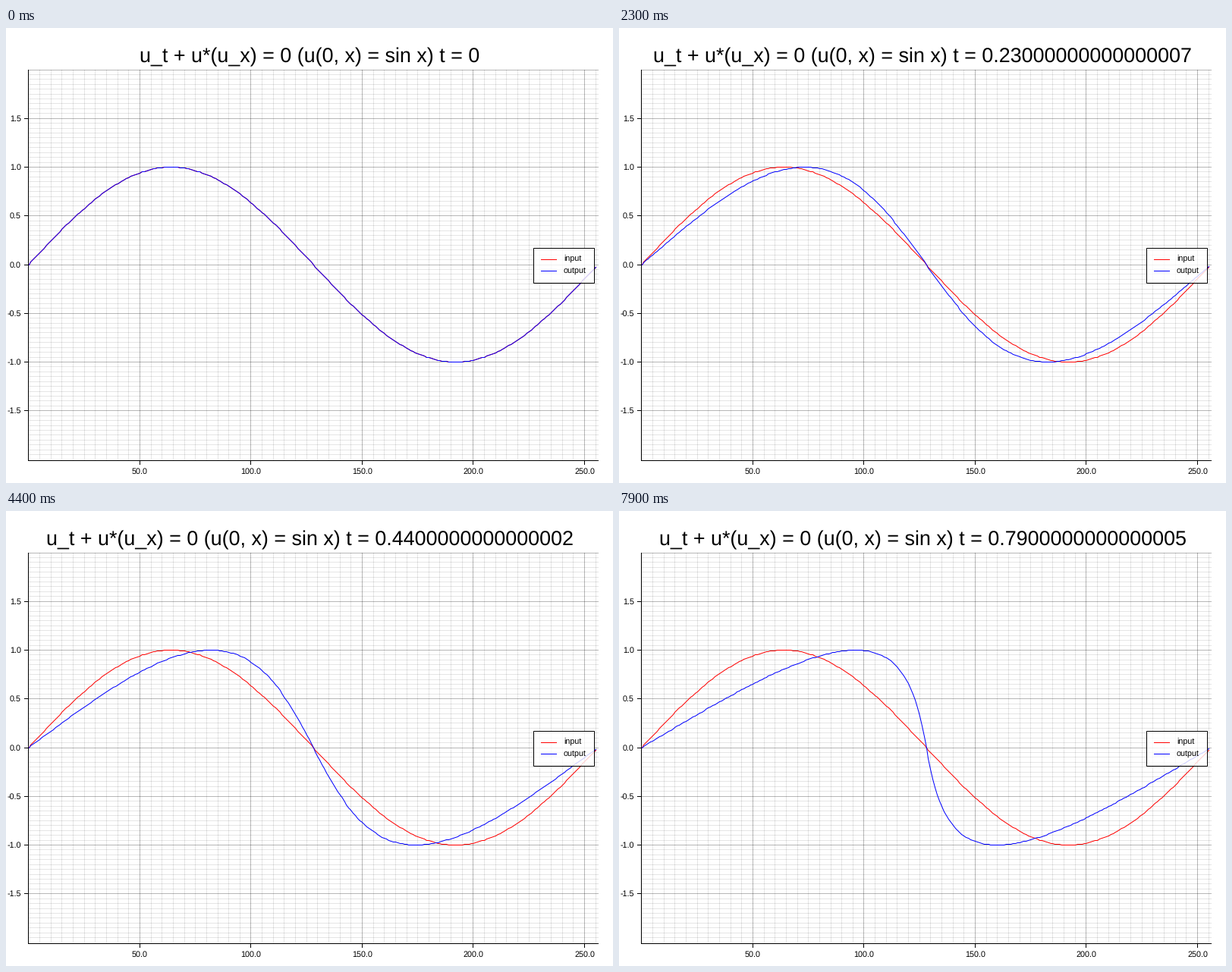
Write a matplotlib script that moves like this. It is 800 by 600 pixels and loops after 8 s.

```python
import numpy as np
import matplotlib.pyplot as plt
from itertools import accumulate
from matplotlib.animation import FuncAnimation
from matplotlib.collections import LineCollection
from matplotlib.patches import Rectangle

W, H, DPI = 800, 600, 100
PX = 72 / DPI
N, FRAMES, STEP = 256, 80, 0.01
LEFT, RIGHT, TOP, BOTTOM = 30, 780, 55, 569

plt.rcParams.update({"font.family": "Liberation Sans", "text.hinting": "none",
                     "path.snap": False})
fig = plt.figure(figsize=(W / DPI, H / DPI), dpi=DPI, facecolor="white")
ax = fig.add_axes([0, 0, 1, 1])
ax.set_xlim(0, W)
ax.set_ylim(H, 0)
ax.axis("off")


# data to pixel centres
def px(x):
    return np.floor(LEFT + np.asarray(x) * (RIGHT - LEFT) / N + 1e-9) + 0.5


def py(y):
    return np.floor((TOP + BOTTOM) / 2 - np.asarray(y) * (BOTTOM - TOP) / 4 + 1e-9) + 0.5


def segments(segs, color, alpha=1, z=1):
    lines = LineCollection(segs, colors=color, alpha=alpha, linewidths=PX,
                           zorder=z, capstyle="butt")
    lines.set_snap(False)
    ax.add_collection(lines)


def vlines(xs, y0, y1):
    return [[(x, y0), (x, y1)] for x in xs]


def hlines(ys, x0, x1):
    return [[(x0, y), (x1, y)] for y in ys]


def label(x, y, s, size=10.74, ha="center"):
    return ax.text(x, y, s, fontsize=size * PX, ha=ha, va="baseline",
                   color="black", zorder=7)


# mesh
x_major = np.arange(50, 251, 50)
y_major = np.arange(-3, 4) / 2
for xs, ys, alpha in ((np.arange(5, N, 5), np.arange(-39, 41) / 20, 0.1),
                      (x_major, np.append(y_major, 2), 0.2)):
    segments(vlines(px(xs), TOP, BOTTOM + 1), "black", alpha)
    segments(hlines(py(ys), LEFT, RIGHT + 1), "black", alpha)

# axes, ticks and tick labels
segments(vlines([29.5], TOP, 571) + hlines([570.5], 29, RIGHT + 1), "black", z=2)
segments(vlines(px(x_major), 570, 576) + hlines(py(y_major), 24, 30), "black", z=2)
for v in x_major:
    label(px(v), 588, f"{v:.1f}")
for v in y_major:
    label(20, py(v) + 3.5, f"{v:.1f}", ha="right")

# curves
index = np.arange(N)
phase = 2 * np.pi * index / N
ax.plot(px(index), py(np.sin(phase)), color="red", lw=PX, zorder=3)
wave, = ax.plot([], [], color="blue", lw=PX, zorder=4)

# legend
ax.add_patch(Rectangle((695.5, 290.5), 80, 46, fc=(1, 1, 1, 0.8), ec="black",
                       lw=PX, zorder=5, snap=False))
for y, name, color in ((305.5, "input", "red"), (320.5, "output", "blue")):
    segments(hlines([y], 705, 726), color, z=6)
    label(735, y + 2.5, name, ha="left")

title = label(400, 45, "", size=26.86)
times = list(accumulate([0.0] + [STEP] * (FRAMES - 1)))


def burgers(t):
    """Solve u = sin(x - u t) by fixed-point iteration."""
    u = np.sin(phase)
    for _ in range(120):
        u = np.sin(phase - u * t)
    return u


def update(i):
    t = times[i]
    wave.set_data(px(index), py(burgers(t)))
    title.set_text(f"u_t + u*(u_x) = 0 (u(0, x) = sin x) t = {t if i else 0}")
    return wave, title


anim = FuncAnimation(fig, update, frames=FRAMES, interval=100, repeat=True,
                     repeat_delay=0, blit=False)
plt.show()
```
